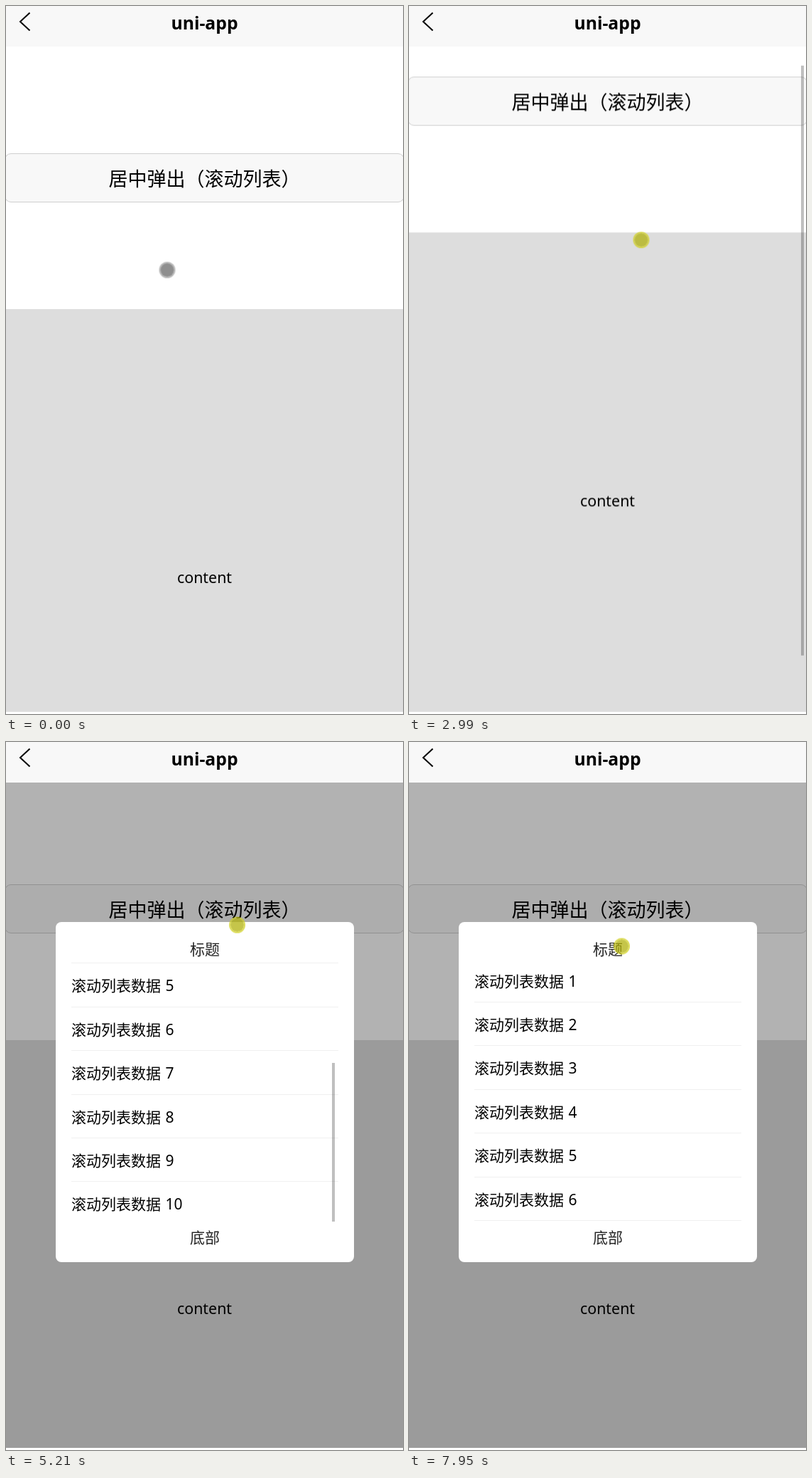
An HTML page for the animation above (8 s loop, 559 by 995 pixels).

```html
<!DOCTYPE html>
<html lang="zh-CN">
<head>
<meta charset="utf-8">
<title>uni-app</title>
<style>
html, body { margin: 0; width: 100%; height: 100%; overflow: hidden; background: #fff; }
body { position: relative; color: #000; font-family: "Noto Sans", "Noto Sans CJK SC", sans-serif; }
div, svg { position: absolute; box-sizing: border-box; white-space: nowrap; }
.anim { animation: 8s linear infinite; }
.step { animation: 8s step-end infinite; }
.center { text-align: center; }

#header { left: 0; top: 0; width: 559px; height: 57px; background: #f8f8f8; }
#title { left: 0; top: 4px; width: 559px; font: 700 24.7px/40px "Noto Sans", sans-serif; }
#view { left: 0; top: 57px; width: 559px; height: 935px; overflow: hidden; }
#page { left: 0; top: -57px; width: 559px; height: 1195px; animation-name: page; }
#button {
  left: -2px; top: 207px; width: 563px; height: 69px; border: 1px solid #cfcfcf; border-radius: 9px;
  background: #f8f8f8; font-size: 27px; line-height: 70px; animation-name: press;
}
#content { left: 0; top: 426px; width: 559px; height: 769px; background: #ddd; font-size: 21.4px; line-height: 754px; }
#mask { left: 0; top: 57px; width: 559px; height: 935px; background: rgba(0,0,0,.3); }
#popup { left: 70px; top: 253px; width: 420px; height: 477.5px; border-radius: 8px; background: #fff; font-size: 21px; }
#mask, #popup { animation-name: open; }
.label { left: 0; width: 420px; line-height: 30px; color: #222; }
#list { left: 22px; top: 51.5px; width: 376px; height: 375px; overflow: hidden; }
#rows { left: 0; top: 0; width: 376px; animation-name: rows; }
#rows div { position: static; height: 61.45px; line-height: 62.5px; border-bottom: 1.5px solid #f0f0f0; word-spacing: 1px; }
#rows div:last-child { border: 0; }
.thumb { background: rgba(0,0,0,.25); width: 4.5px; }
#pageThumb { left: 551.5px; top: 0; height: 829px; animation-name: pageThumb, pageFade; }
#listThumb { left: 388.5px; top: 56px; height: 223px; animation-name: listThumb, listFade; }
#cursor { left: -11.5px; top: -11.5px; width: 23px; height: 23px; animation-name: move; }
#dot {
  width: 23px; height: 23px; border-radius: 50%; border: 2px solid rgba(0,0,0,.27);
  background: rgba(0,0,0,.44); background-clip: padding-box; animation-name: dot;
}

@keyframes page {
  0%, 9% { transform: translateY(0); }
  11.9%, 16.75% { transform: translateY(-203px); }
  17.75% { transform: translateY(-184px); }
  18.6% { transform: translateY(-159px); }
  24.2%, 25.2% { transform: translateY(-7px); }
  32.5%, 34% { transform: translateY(-203px); }
  37.375% { transform: translateY(-108px); }
  40% { transform: translateY(-49px); }
  41.9%, 100% { transform: translateY(-7px); }
}
@keyframes pageThumb {
  0%, 9% { transform: translateY(1px); }
  11.9%, 16.75% { transform: translateY(163px); }
  17.75% { transform: translateY(147px); }
  18.6% { transform: translateY(127px); }
  24.2%, 25.2% { transform: translateY(1px); }
  32.5%, 34% { transform: translateY(163px); }
  37.375% { transform: translateY(84px); }
  40% { transform: translateY(35.5px); }
  41.9%, 100% { transform: translateY(1px); }
}
@keyframes pageFade {
  0%, 9.1% { opacity: 0; }
  9.11%, 50% { opacity: 1; }
  52%  { opacity: .12; }
  52.4%, 100% { opacity: 0; }
}
@keyframes rows {
  0%, 59% { transform: translateY(0); }
  62.7%, 68% { transform: translateY(-239px); }
  75% { transform: translateY(-147px); }
  77.8%, 100% { transform: translateY(0); }
}
@keyframes listThumb {
  0%, 59% { transform: translateY(0); }
  62.7%, 68% { transform: translateY(142px); }
  75% { transform: translateY(87.3px); }
  77.8%, 100% { transform: translateY(0); }
}
@keyframes listFade {
  0%, 86.5% { opacity: 1; }
  89%, 100% { opacity: 0; }
}
@keyframes open {
  0% { visibility: hidden; }
  51.6%, 100% { visibility: visible; }
}
@keyframes press {
  0%, 52.45% { background: #f8f8f8; color: #000; }
  50.2% { background: #dedede; color: rgba(0,0,0,.6); }
}
@keyframes move {
  0%, .6% { transform: translate(226.5px, 370.5px); }
  2.5%, 3.9% { transform: translate(283px, 388px); }
  7.25%, 9% { transform: translate(312px, 567px); }
  11.9% { transform: translate(312px, 364px); }
  15%, 16.75% { transform: translate(312px, 216px); }
  17.75% { transform: translate(312px, 235px); }
  18.6% { transform: translate(313px, 260px); }
  24.2% { transform: translate(317px, 412px); }
  25.2% { transform: translate(318px, 425px); }
  32.5% { transform: translate(325px, 229px); }
  33% { transform: translate(325px, 222px); }
  34% { transform: translate(326px, 233px); }
  37.375% { transform: translate(326.5px, 328px); }
  40% { transform: translate(326px, 387px); }
  41.9% { transform: translate(325px, 429px); }
  42.8%, 43.7% { transform: translate(325px, 445px); animation-timing-function: ease-in-out; }
  48.5%, 54.4% { transform: translate(314px, 243px); animation-timing-function: ease-in-out; }
  58.1%, 59% { transform: translate(322px, 650px); }
  62.7% { transform: translate(324px, 411px); }
  65.125% { transform: translate(325px, 257px); }
  66.5%, 68% { transform: translate(326px, 213px); }
  75% { transform: translate(330px, 305px); }
  77.8% { transform: translate(333px, 452px); }
  81.5%, 83.5% { transform: translate(340px, 686px); }
  85.25% { transform: translate(340px, 607px); }
  86.1% { transform: translate(338px, 580px); }
  96.9%, 97.5% { transform: translate(302px, 319px); }
  99.3%, 100% { transform: translate(299px, 286.5px); }
}
@keyframes dot {
  0%, 43.5%, 50.6%, 52.45%, 82.5% { background-color: rgba(0,0,0,.44); border-color: rgba(0,0,0,.27); }
  9.1%, 49.5%, 58.8%, 99.3%, 100% { background-color: rgba(177,177,11,.74); border-color: rgba(208,208,30,.74); }
  51.6% { background-color: rgba(0,0,0,.58); border-color: rgba(0,0,0,.4); }
}
</style>
</head>
<body>
<div id="view">
  <div id="page" class="anim">
    <div id="button" class="step center">居中弹出（滚动列表）</div>
    <div id="content" class="center">content</div>
  </div>
</div>
<div id="header">
  <svg width="50" height="57" fill="none" stroke="#000" stroke-width="2"><path d="M33.5 9.5 20 22 33.5 34.5"/></svg>
  <div id="title" class="center">uni-app</div>
</div>
<div id="mask" class="step"></div>
<div id="pageThumb" class="anim thumb"></div>
<div id="popup" class="step">
  <div class="label center" style="top:23px">标题</div>
  <div id="list"><div id="rows" class="anim"></div></div>
  <div class="label center" style="top:427.5px">底部</div>
  <div id="listThumb" class="anim thumb"></div>
</div>
<div id="cursor" class="anim"><div id="dot" class="step"></div></div>
<script>
const rows = document.getElementById('rows');
for (let i = 1; i <= 10; i++) {
  const row = document.createElement('div');
  row.textContent = '滚动列表数据 ' + i;
  rows.append(row);
}
</script>
</body>
</html>
```
